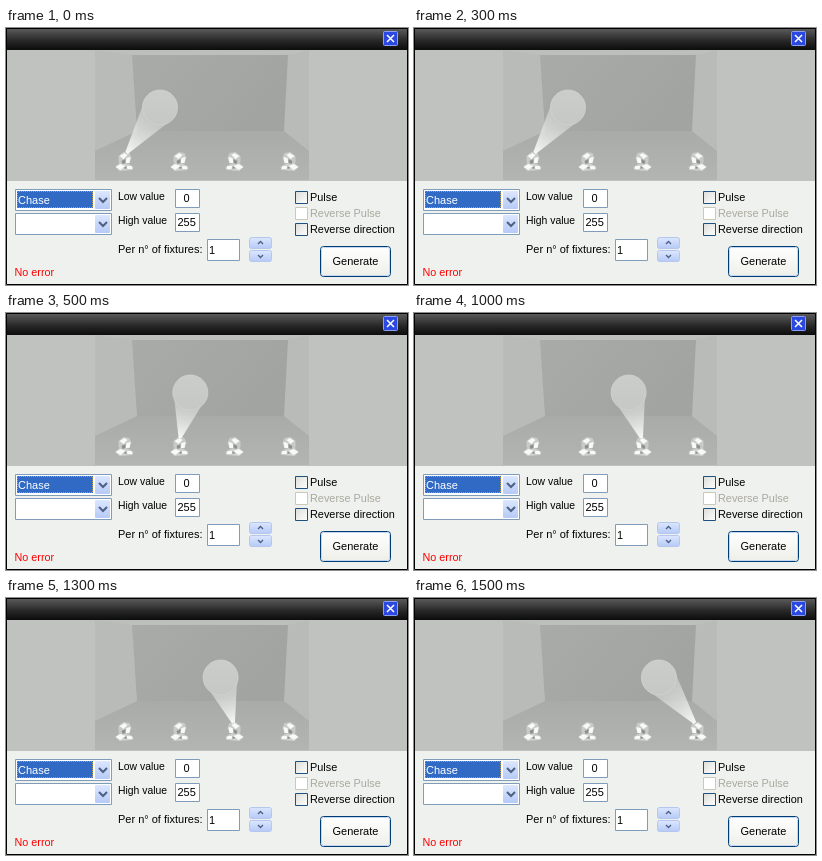
Animation of 402 by 257 pixels, one loop 2 s. Source, as an HTML page:

```html
<!DOCTYPE html>
<html lang="en">
<head>
<meta charset="utf-8">
<title>Chase generator</title>
<style>
html, body { margin: 0; width: 100%; height: 100%; overflow: hidden; }
svg { display: block; width: 402px; height: 257px; font: 11px "Liberation Sans", Arial, sans-serif; }
.field { fill: #fff; stroke: #7f9db9; }
.chevron { fill: none; stroke: #4d6185; }
</style>
</head>
<body>
<svg viewBox="0 0 402 257">
  <defs>
    <linearGradient id="title" x2="0" y2="1">
      <stop stop-color="#5e5e5e"/><stop offset=".6" stop-color="#262626"/><stop offset="1" stop-color="#0c0c0c"/>
    </linearGradient>
    <linearGradient id="wall" x2="1" y2=".4">
      <stop stop-color="#a9aba8"/><stop offset="1" stop-color="#a2a4a1"/>
    </linearGradient>
    <linearGradient id="floor" x2="0" y2="1">
      <stop stop-color="#a9aba8"/><stop offset="1" stop-color="#b3b5b2"/>
    </linearGradient>
    <linearGradient id="blue" x2="0" y2="1">
      <stop stop-color="#dce7ff"/><stop offset="1" stop-color="#b6caf7"/>
    </linearGradient>
    <linearGradient id="face" x2="0" y2="1">
      <stop stop-color="#fff"/><stop offset="1" stop-color="#eeeee9"/>
    </linearGradient>
    <linearGradient id="box" x2="1" y2="1">
      <stop stop-color="#dcdcd7"/><stop offset="1" stop-color="#fff"/>
    </linearGradient>
    <linearGradient id="light" gradientUnits="userSpaceOnUse">
      <stop stop-color="#fff" stop-opacity=".9"/>
      <stop offset=".4" stop-color="#e5e7e4" stop-opacity=".75"/>
      <stop offset="1" stop-color="#d0d2cf" stop-opacity=".5"/>
    </linearGradient>
    <linearGradient id="spotFill" x2="0" y2="1">
      <stop stop-color="#cbcdca"/><stop offset="1" stop-color="#c6c8c5"/>
    </linearGradient>
    <g id="fixture">
      <path d="M-9 6L-5 2L4 3L9 6L8 9L-5 10Z" fill="#cfd1ce"/>
      <path d="M-6-5L-1-9L5-8L7-3L5 2L-3 4L-6 1Z" fill="#c9cbc8"/>
      <path d="M-5-5L0-8L3-6L-1-2ZM2-3L6-4L5 2L1 2ZM-9 6L-4 3L1 5L-4 9ZM2 5L7 5L8 8L3 8Z" fill="#f8faf7"/>
      <path d="M-3 0L1-2L1 2L-2 3ZM-1 7L2 5L2 8Z" fill="#8f918e"/>
    </g>
    <g id="combo">
      <path class="field" d="M.5.5h96v21h-96z"/>
      <rect x="80" y="2" width="15" height="18" rx="1" fill="url(#blue)"/>
      <path class="chevron" stroke-width="2" d="M84 9l4 4l4-4"/>
    </g>
    <rect id="step" x=".5" y=".5" width="22" height="11" rx="2" fill="url(#blue)" stroke="#b5c7ec"/>
  </defs>

  <path fill="#eff1ee" d="M0 0h402v257H0z"/>
  <path fill="#c0c2bf" d="M1 22h400v131H1z"/>
  <path fill="url(#title)" d="M0 0h402v22H0z"/>

  <rect x="377.500" y="3.500" width="14" height="14" rx="1" fill="#2b48e0" stroke="#8d9ff0"/>
  <path d="M381 7l7 7m0-7l-7 7" stroke="#fff" stroke-width="1.500"/>

  <path fill="#b9bbb8" d="M89 22h214v130H89z"/>
  <path fill="#bdbfbc" d="M89 22h214l-21 5H126z"/>
  <path fill="url(#floor)" d="M131 103h147l25 20v29H89v-29z"/>
  <path fill="url(#wall)" d="M126 27h156l-4 76H131z"/>
  <g id="fixtures"></g>
  <path id="beam" fill="url(#light)"/>
  <circle id="spot" cy="79.500" r="17.500" fill="url(#spotFill)" stroke="#d2d4d1" stroke-width=".8"/>

  <use href="#combo" x="9" y="161"/>
  <use href="#combo" x="9" y="185"/>
  <path fill="#316ac5" d="M11 163h76v17H11z"/>
  <path d="M11.500 163.500h75v16h-75z" fill="none" stroke="#ce953a" stroke-dasharray="1" stroke-dashoffset=".5"/>
  <text x="12" y="176" fill="#fff">Chase</text>

  <g font-size="10.400">
    <text x="112" y="172">Low value</text>
    <text x="112" y="196">High value</text>
  </g>
  <text x="112" y="225">Per n° of fixtures:</text>
  <path class="field" d="M169.500 161.500h24v18h-24zM169.500 185.500h24v18h-24zM201.500 211.500h32v21h-32z"/>
  <text x="177.500" y="174">0</text>
  <text x="171.500" y="198">255</text>
  <text x="203" y="226">1</text>

  <use href="#step" x="243" y="209"/>
  <use href="#step" x="243" y="222"/>
  <path class="chevron" stroke-width="1.400" d="M252 216l2.500-2.500l2.500 2.500M252 227l2.500 2.500l2.500-2.500"/>

  <g fill="url(#box)" stroke="#1c5180">
    <path d="M289.500 163.500h12v12h-12z"/>
    <path d="M289.500 179.500h12v12h-12z" fill="#fff" stroke="#cac8bb"/>
    <path d="M289.500 195.500h12v12h-12z"/>
  </g>
  <g font-size="10.900">
    <text x="304" y="173">Pulse</text>
    <text x="304" y="189" fill="#aaa99f">Reverse Pulse</text>
    <text x="304" y="205">Reverse direction</text>
  </g>

  <rect x="314.500" y="218.500" width="70" height="30" rx="3" fill="url(#face)" stroke="#003c74"/>
  <rect x="315.500" y="219.500" width="68" height="28" rx="2" fill="none" stroke="#c3d6f2"/>
  <text x="326.500" y="237">Generate</text>
  <text x="8.500" y="248" font-size="10.800" fill="#f00">No error</text>
  <path d="M.5.5h401v256H.5z" fill="none" stroke="#000"/>
</svg>
<script>
const $ = id => document.getElementById(id);
const STEP = 500, COUNT = 4, RADIUS = 17.5, SPOT_Y = 79.5, LAMP_Y = 125;

// The right half of the row faces the other way.
$('fixtures').innerHTML = Array.from({ length: COUNT }, (_, i) =>
  `<use href="#fixture" transform="translate(${118.5 + 55 * i} 133) scale(${i < COUNT / 2 ? 1 : -1} 1)"/>`).join('');

function showBeam(i) {
  const x = 120.5 + 53.5 * i, spotX = 154 + 30.3 * i;
  const dx = spotX - x, dy = SPOT_Y - LAMP_Y, length = Math.hypot(dx, dy);
  const nx = -dy / length, ny = dx / length;
  const edge = (px, py, w) => `${px + nx * w} ${py + ny * w}`;
  $('beam').setAttribute('d', `M${edge(x, LAMP_Y, -1.5)}L${edge(spotX, SPOT_Y, -RADIUS)}` +
    `L${edge(spotX, SPOT_Y, RADIUS)}L${edge(x, LAMP_Y, 1.5)}Z`);
  $('spot').setAttribute('cx', spotX);
  const ends = { x1: x, y1: LAMP_Y, x2: spotX, y2: SPOT_Y };
  for (const key in ends) $('light').setAttribute(key, ends[key]);
}

function frame() {
  showBeam(Math.floor(performance.now() / STEP) % COUNT);
  requestAnimationFrame(frame);
}
frame();
</script>
</body>
</html>
```
